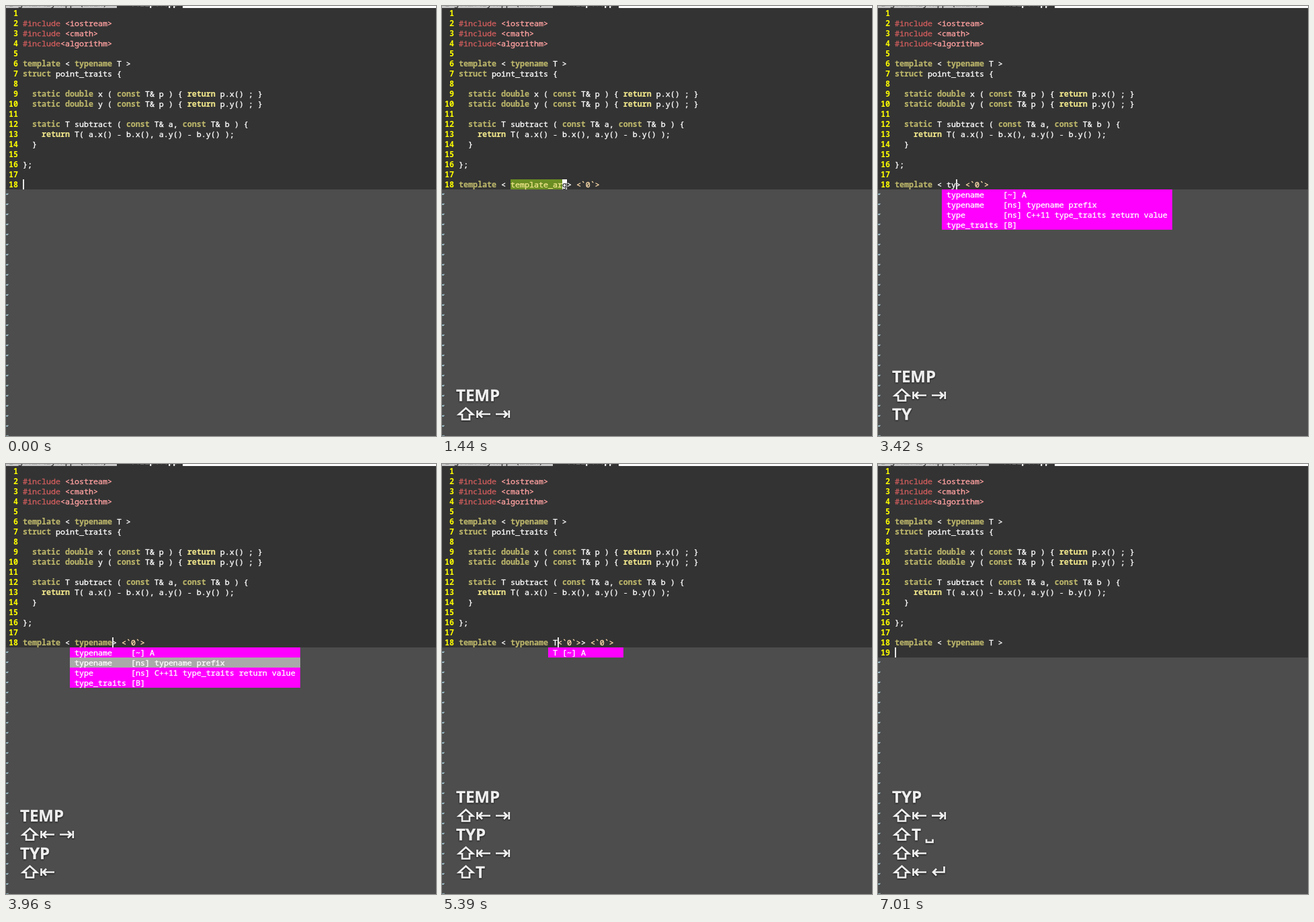
Animation of 640 by 640 pixels, one loop 8 s. Source, as an HTML page:

```html
<!DOCTYPE html>
<html lang="en">
<head>
<meta charset="utf-8">
<title>Snippet completion in an editor</title>
<style>
  html, body { margin: 0; width: 100%; height: 100%; overflow: hidden; background: #4d4d4d; }
  #stage {
    position: relative; width: 640px; height: 640px; overflow: hidden; background: #4d4d4d;
    font: 11.667px/15px "Noto Sans Mono", "DejaVu Sans Mono", monospace; color: #fff;
    white-space: pre; font-variant-ligatures: none; -webkit-text-stroke: .35px;
  }
  #stage div { box-sizing: border-box; }
  #tabs { position: absolute; top: -12px; left: -3px; width: 643px; height: 15px; background: #fff; display: flex; }
  #tabs div { height: 15px; background: #c8c8c8; color: #333; }
  #tabs .open { background: #333; color: #fff; font-weight: bold; }
  #code { position: absolute; top: 3px; left: 0; width: 640px; background: #333; }
  .line { height: 15px; padding-left: 4px; }
  .num { color: #ff0; font-weight: bold; -webkit-text-stroke: 0; }
  .inc { color: #cd5c5c; }
  .lib { color: #ffa0a0; }
  .mark { color: #ffdead; }
  .kw, .ret { font-weight: bold; -webkit-text-stroke: .15px; }
  .kw { color: #bdb76b; }
  .ret { color: #f0e68c; }
  .sel, .block { display: inline-block; height: 15px; vertical-align: top; }
  .sel { background: #6b8e23; color: #f0e68c; }
  .block { background: #fff; color: #333; }
  #tildes { position: absolute; left: -3px; margin-top: -1px; color: #add8e6; font-weight: bold; }
  #bar { position: absolute; width: 2px; height: 15px; background: #e6e6e6; }
  #popup { position: absolute; top: 273px; min-width: 112px; background: #f0f; }
  #popup div { height: 15px; padding: 0 7px; }
  #popup .on { background: #a9a9a9; }
  #keys {
    position: absolute; left: 21px; bottom: 19px; color: #f0f0f0;
    font: bold 24px/28px "Open Sans", "Noto Sans", sans-serif;
    filter: drop-shadow(0 1px 1px rgba(0, 0, 0, .75));
  }
  #keys div { height: 28px; display: flex; }
  #keys svg { width: 29px; height: 28px; overflow: visible; fill: none; stroke: #f0f0f0; stroke-width: 2.7; }
</style>
</head>
<body>
<div id="stage">
  <div id="tabs"><div> 1 geometry.hpp (main)  </div><div class="open"> + script.cpp </div></div>
  <div id="code"></div>
  <div id="tildes"></div>
  <div id="bar"></div>
  <div id="popup"></div>
  <div id="keys"></div>
</div>
<script>
const LOOP = 8000, CELL = 7, ROW = 15, TOP = 3, LEFT = 25, MAX_KEYS = 5;
const $ = id => document.getElementById(id);

const source = `
#include <iostream>
#include <cmath>
#include<algorithm>

template < typename T >
struct point_traits {

  static double x ( const T& p ) { return p.x() ; }
  static double y ( const T& p ) { return p.y() ; }

  static T subtract ( const T& a, const T& b ) {
    return T( a.x() - b.x(), a.y() - b.y() );
  }

};
`.split('\n');

const tem = ['template [~] A', 'typename [~] A', 'template [ns] template<...>', 'typename [ns] typename prefix'];
const temp = [tem[0], tem[2]];
const typ = ['typename    [~] A', 'typename    [ns] typename prefix',
  'type        [ns] C++11 type_traits return value', 'type_traits [B]'];

// "|" is the insert cursor, «» a selection, ‹› the block cursor.
const steps = [
  { at: 0, text: '|', keys: '' },
  { at: 540, text: 'te|', keys: 'TE' },
  { at: 720, text: 'tem|', keys: 'TEM', list: tem, col: 0 },
  { at: 900, text: 'temp|', keys: 'TEMP', list: temp, col: 0 },
  { at: 1260, text: 'template|', keys: 'TEMP ⇧⇤', list: temp, col: 0, pick: 1 },
  { at: 1440, text: 'template < «template_ar»‹g›> <`0`>', keys: 'TEMP ⇧⇤⇥' },
  { at: 3240, text: 'template < t|> <`0`>', keys: 'TEMP ⇧⇤⇥ T' },
  { at: 3420, text: 'template < ty|> <`0`>', keys: 'TEMP ⇧⇤⇥ TY', list: typ, col: 11 },
  { at: 3600, text: 'template < typ|> <`0`>', keys: 'TEMP ⇧⇤⇥ TYP', list: typ, col: 11 },
  { at: 3960, text: 'template < typename|> <`0`>', keys: 'TEMP ⇧⇤⇥ TYP ⇧⇤', list: typ, col: 11, pick: 1 },
  { at: 4130, text: 'template < typename «typ»‹e›<`0`>> <`0`>', keys: 'TEMP ⇧⇤⇥ TYP ⇧⇤⇥' },
  { at: 5390, text: 'template < typename T|<`0`>> <`0`>', keys: 'TEMP ⇧⇤⇥ TYP ⇧⇤⇥ ⇧T', list: ['T [~] A'], col: 20 },
  { at: 5750, text: 'template < typename T |<`0`>> <`0`>', keys: 'TEMP ⇧⇤⇥ TYP ⇧⇤⇥ ⇧T␣' },
  { at: 5930, text: 'template < typename T |> <`0`>', keys: 'TEMP ⇧⇤⇥ TYP ⇧⇤⇥ ⇧T␣ ⇧⇤' },
  { at: 6290, text: 'template < typename T > |', keys: 'TEMP ⇧⇤⇥ TYP ⇧⇤⇥ ⇧T␣ ⇧⇤ ⇧⇤' },
  { at: 7010, text: 'template < typename T >\n|', keys: 'TEMP ⇧⇤⇥ TYP ⇧⇤⇥ ⇧T␣ ⇧⇤ ⇧⇤↵' }
];

const icons = {
  '⇧': 'M14.5 5.5L25 15H20V22.5H9V15H4Z',
  '⇤': 'M2.5 9V20M5 14.5H22M10 9.5L5 14.5L10 19.5',
  '⇥': 'M1 14.5H18M13 9.5L18 14.5L13 19.5M20.8 9V20',
  '↵': 'M19.5 6V14.5H3M8 9.5L3 14.5L8 19.5',
  '␣': 'M8 21.5V26H17.5V21.5'
};

const escapeHtml = s => s.replace(/&/g, '&amp;').replace(/</g, '&lt;');

const tokens = /(?<inc>#include)|(?<lib><\w+>)|(?<mark><`0`>)|\b(?<kw>template|typename|struct|static|double|const)\b|\b(?<ret>return)\b|«(?<sel>.*?)»|‹(?<block>.)›|[<&]/g;

function highlight(text) {
  return text.replace(tokens, (match, ...rest) => {
    const hit = Object.entries(rest.pop()).find(([, value]) => value);
    return hit ? `<span class="${hit[0]}">${escapeHtml(hit[1])}</span>` : escapeHtml(match);
  });
}

function numbered(text, i) {
  const num = String(i + 1).padStart(2);
  return `<div class="line"><span class="num">${num}</span> ${highlight(text)}</div>`;
}

function keyRow(row) {
  const cells = row.replace(/[⇧⇤⇥↵␣]/g, c => `<svg><path d="${icons[c]}"/></svg>`);
  return `<div>${cells}</div>`;
}

function show({ text, keys, list = [], col = 0, pick = -1 }) {
  const lines = source.concat(text.split('\n'));
  $('code').innerHTML = lines.map(line => line.replace('|', '')).map(numbered).join('');

  const end = TOP + lines.length * ROW;
  $('tildes').style.top = end + 'px';
  $('tildes').textContent = '~\n'.repeat(Math.ceil((640 - end) / ROW));

  const last = lines[lines.length - 1], at = last.indexOf('|');
  $('bar').hidden = at < 0;
  $('bar').style.left = LEFT + at * CELL + 'px';
  $('bar').style.top = end - ROW + 'px';

  $('popup').hidden = !list.length;
  $('popup').style.left = LEFT + (col - 1) * CELL + 'px';
  $('popup').innerHTML = list.map((item, i) =>
    `<div class="${i === pick ? 'on' : ''}">${escapeHtml(item)}</div>`).join('');

  $('keys').innerHTML = keys.split(' ').slice(-MAX_KEYS).map(keyRow).join('');
}

let shown;
function tick() {
  const t = performance.now() % LOOP;
  const step = steps.filter(s => s.at <= t).pop();
  if (step !== shown) show(shown = step);
  requestAnimationFrame(tick);
}
tick();
</script>
</body>
</html>
```
